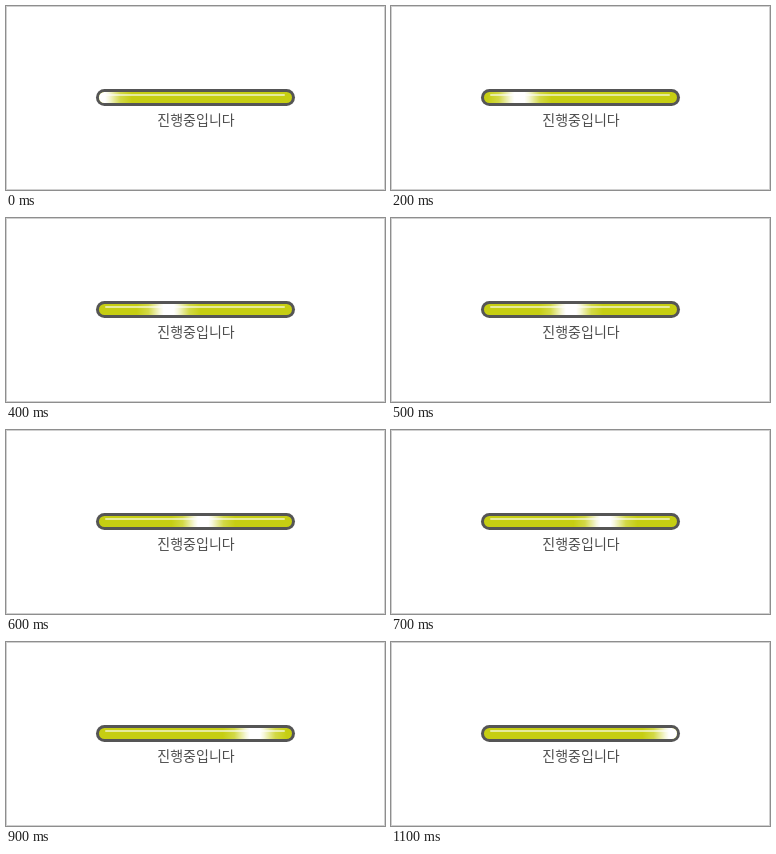
Animation, 379 px wide and 184 px high, one loop 1200 ms. Source, as an HTML page with a canvas:

```html
<!DOCTYPE html>
<html lang="ko">
<head>
<meta charset="utf-8">
<title>진행중</title>
<style>
  html, body { margin: 0; width: 100%; height: 100%; overflow: hidden; background: #fff; }
  canvas, svg { position: absolute; left: 0; top: 0; width: 379px; height: 184px; }
  text { font: 14px "Noto Sans CJK KR", "Noto Sans CJK", sans-serif; fill: #4d4d4d; text-anchor: middle; }
</style>
</head>
<body>
<canvas id="stage"></canvas>
<svg viewBox="0 0 379 184"><text x="190" y="118.5">진행중입니다</text></svg>
<script>
const W = 379, H = 184, STEP = 100, STEPS = 12;
const canvas = document.getElementById('stage');
const ctx = canvas.getContext('2d');
const dpr = window.devicePixelRatio || 1;
canvas.width = Math.round(W * dpr);
canvas.height = Math.round(H * dpr);
ctx.scale(dpr, dpr);

function pill(x, y, w, h, fill) {
  ctx.beginPath();
  ctx.roundRect(x, y, w, h, h / 2);
  ctx.fillStyle = fill;
  ctx.fill();
}

// White glow: solid in the middle, fading out on both sides
function glow(center) {
  const half = 32;
  const g = ctx.createLinearGradient(center - half, 0, center + half, 0);
  const stops = [[0, 0], [0.18, 0.22], [0.36, 0.85], [0.42, 1]];
  for (const [at, alpha] of stops) {
    g.addColorStop(at, `rgba(255,255,255,${alpha})`);
    g.addColorStop(1 - at, `rgba(255,255,255,${alpha})`);
  }
  return g;
}

function draw(step) {
  ctx.fillStyle = '#fff';
  ctx.fillRect(0, 0, W, H);
  ctx.strokeStyle = '#d0d0d0';
  ctx.lineWidth = 1;
  ctx.strokeRect(0.5, 0.5, W - 1, H - 1);

  pill(90, 83, 199, 17, '#555');
  pill(93, 86, 193, 11, '#c6ce12');
  pill(99, 88, 180, 2, '#e6eb9c');
  pill(93, 86, 193, 11, glow(94 + step * 17.2));
}

function frame(now) {
  draw(Math.floor(now / STEP) % STEPS);
  requestAnimationFrame(frame);
}

draw(0);
requestAnimationFrame(frame);
</script>
</body>
</html>
```
